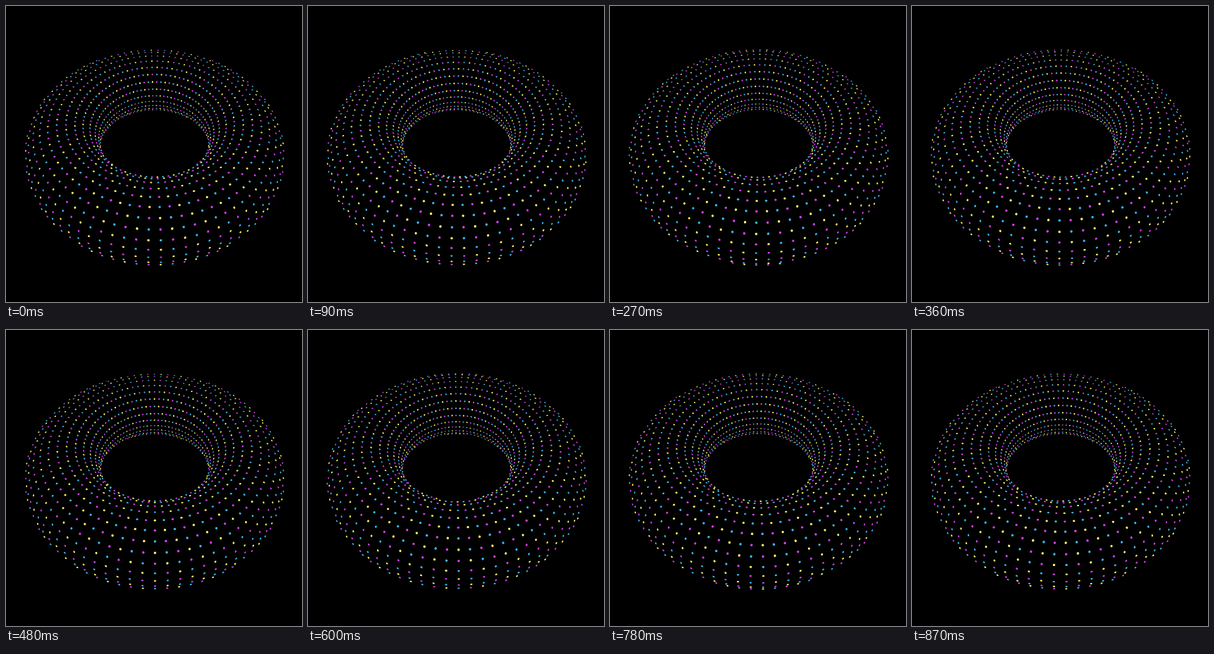
Write an HTML page without scripts that moves like this. It is 420 px wide and 420 px high and loops after 0.9 s.

```html
<!DOCTYPE html>
<html lang="en">
<head>
<meta charset="utf-8">
<title>Rolling dotted torus</title>
<style>
@property --t { syntax: "<number>"; inherits: true; initial-value: 0; }
@property --sin-col { syntax: "<number>"; inherits: true; initial-value: 0; }
@property --cos-col { syntax: "<number>"; inherits: true; initial-value: 1; }
@property --sin-row { syntax: "<number>"; inherits: false; initial-value: 0; }
@property --cos-row { syntax: "<number>"; inherits: false; initial-value: 1; }
@property --out { syntax: "<number>"; inherits: false; initial-value: 0; }
@property --up { syntax: "<number>"; inherits: false; initial-value: 0; }
@property --near { syntax: "<number>"; inherits: false; initial-value: 0; }
@property --facing { syntax: "<number>"; inherits: false; initial-value: 0; }
@property --zoom { syntax: "<number>"; inherits: false; initial-value: 1; }

html, body {
  margin: 0;
  width: 100%;
  height: 100%;
  overflow: hidden;
  background: #000;
}
svg {
  --ring: 125.4;
  --tube: 48.7;
  --camera: 400;
  --lift: 24.6;
  --sin-tilt: .7955;
  --cos-tilt: .606;
  /* Camera position seen from the torus: along its plane and above it. */
  --camera-out: (var(--camera) * var(--cos-tilt) + var(--lift) * var(--sin-tilt));
  --camera-up: (var(--camera) * var(--sin-tilt) - var(--lift) * var(--cos-tilt));
  --yellow: #fbf766;
  --cyan: #38baee;
  --pink: #d840f2;
  display: block;
  width: 100%;
  height: 100%;
  animation: roll .9s steps(30) infinite;
}
/* One loop turns the torus by one column and rolls the tube by two rows. */
@keyframes roll {
  from { --t: 0; }
  to { --t: 1; }
}
.column {
  --angle: (3 * var(--sector) + var(--col) + var(--t) - .5) / 84 * 1turn;
  --sin-col: sin(var(--angle));
  --cos-col: cos(var(--angle));
}
.c0 { --col: 0; --a: var(--yellow); --b: var(--cyan); --c: var(--pink); }
.c1 { --col: 1; --a: var(--cyan); --b: var(--pink); --c: var(--yellow); }
.c2 { --col: 2; --a: var(--pink); --b: var(--yellow); --c: var(--cyan); }
.a { fill: var(--a); }
.b { fill: var(--b); }
.c { fill: var(--c); }

/* Perspective projection; dots narrow towards the outline and vanish behind it. */
circle {
  --roll: (var(--row) + 2 * var(--t)) / 28 * 1turn + 3deg;
  --sin-row: sin(var(--roll));
  --cos-row: cos(var(--roll));
  --out: calc(var(--ring) + var(--tube) * var(--cos-row));
  --up: calc(var(--tube) * var(--sin-row));
  --near: calc(var(--up) * var(--sin-tilt) + var(--out) * var(--cos-col) * var(--cos-tilt));
  --zoom: calc(var(--camera) / (var(--camera) - var(--near)));
  --facing: calc((var(--sin-row) * var(--camera-up) + var(--cos-row) * var(--cos-col) * var(--camera-out)
    - var(--ring) * var(--cos-row) - var(--tube)) / (var(--camera) - var(--near)));
  r: 1.2px;
  transform:
    translate(
      calc(var(--out) * var(--sin-col) * var(--zoom) * 1px),
      calc((var(--out) * var(--cos-col) * var(--sin-tilt) - var(--up) * var(--cos-tilt) - var(--lift)) * var(--zoom) * 1px))
    rotate(atan2(
      var(--cos-row) * var(--cos-col) * var(--sin-tilt) - var(--sin-row) * var(--cos-tilt),
      var(--cos-row) * var(--sin-col)))
    scale(
      calc(var(--zoom) * clamp(0, var(--facing) * 1000, 1) * max(var(--facing), .65)),
      var(--zoom));
}
</style>
</head>
<body>
<svg viewBox="0 0 420 420">
  <defs>
    <!-- Rows on the underside are never seen and are left out. -->
    <g id="tube">
      <circle class="c" style="--row:-4"/>
      <circle class="a" style="--row:-3"/>
      <circle class="b" style="--row:-2"/>
      <circle class="c" style="--row:-1"/>
      <circle class="a" style="--row:0"/>
      <circle class="b" style="--row:1"/>
      <circle class="c" style="--row:2"/>
      <circle class="a" style="--row:3"/>
      <circle class="b" style="--row:4"/>
      <circle class="c" style="--row:5"/>
      <circle class="a" style="--row:6"/>
      <circle class="b" style="--row:7"/>
      <circle class="c" style="--row:8"/>
      <circle class="a" style="--row:9"/>
      <circle class="b" style="--row:10"/>
      <circle class="c" style="--row:11"/>
      <circle class="a" style="--row:12"/>
      <circle class="b" style="--row:13"/>
      <circle class="c" style="--row:14"/>
      <circle class="a" style="--row:15"/>
      <circle class="b" style="--row:16"/>
      <circle class="c" style="--row:17"/>
    </g>
    <g id="sector">
      <use href="#tube" class="column c0"/>
      <use href="#tube" class="column c1"/>
      <use href="#tube" class="column c2"/>
    </g>
  </defs>
  <g transform="translate(210.9 210.2)">
    <use href="#sector" style="--sector:0"/>
    <use href="#sector" style="--sector:1"/>
    <use href="#sector" style="--sector:2"/>
    <use href="#sector" style="--sector:3"/>
    <use href="#sector" style="--sector:4"/>
    <use href="#sector" style="--sector:5"/>
    <use href="#sector" style="--sector:6"/>
    <use href="#sector" style="--sector:7"/>
    <use href="#sector" style="--sector:8"/>
    <use href="#sector" style="--sector:9"/>
    <use href="#sector" style="--sector:10"/>
    <use href="#sector" style="--sector:11"/>
    <use href="#sector" style="--sector:12"/>
    <use href="#sector" style="--sector:13"/>
    <use href="#sector" style="--sector:14"/>
    <use href="#sector" style="--sector:15"/>
    <use href="#sector" style="--sector:16"/>
    <use href="#sector" style="--sector:17"/>
    <use href="#sector" style="--sector:18"/>
    <use href="#sector" style="--sector:19"/>
    <use href="#sector" style="--sector:20"/>
    <use href="#sector" style="--sector:21"/>
    <use href="#sector" style="--sector:22"/>
    <use href="#sector" style="--sector:23"/>
    <use href="#sector" style="--sector:24"/>
    <use href="#sector" style="--sector:25"/>
    <use href="#sector" style="--sector:26"/>
    <use href="#sector" style="--sector:27"/>
  </g>
</svg>
</body>
</html>
```
